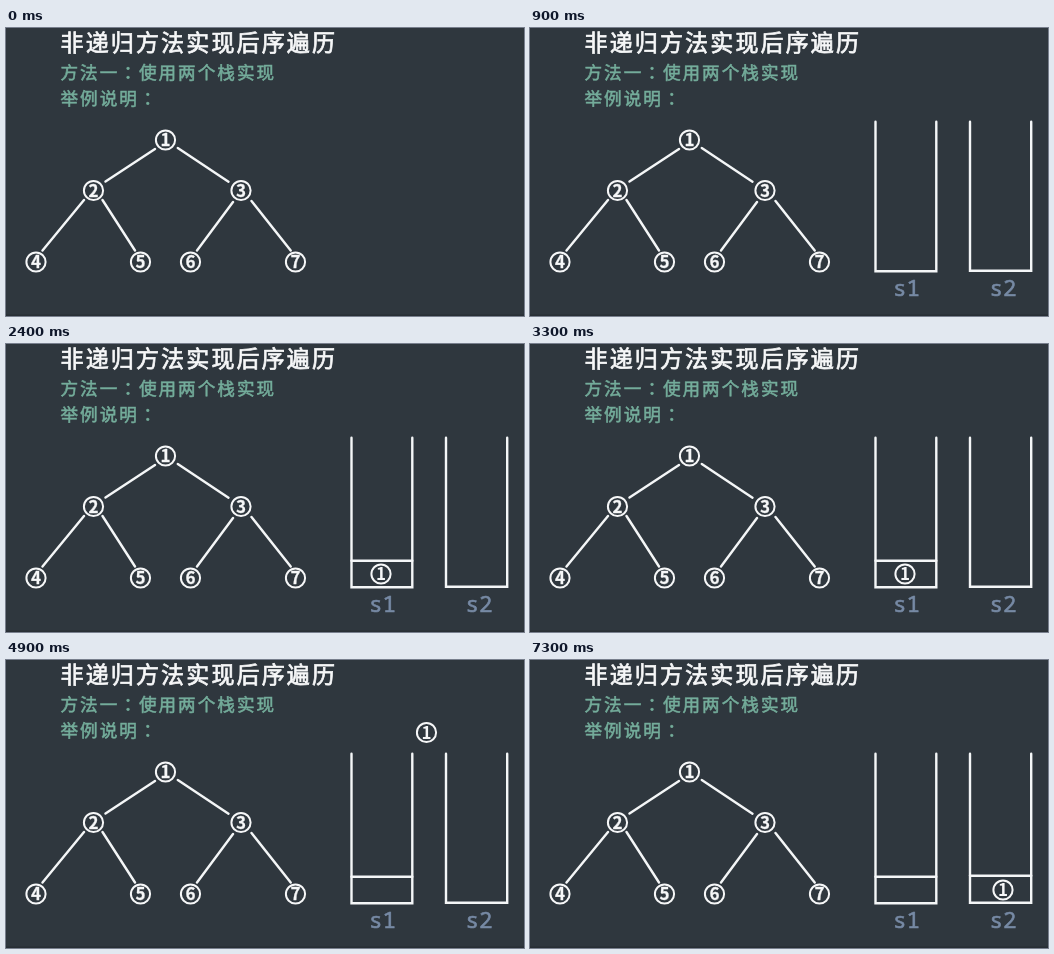
These frames come from a looping animation (518x288 px, 8000 ms). An HTML page:

```html
<!DOCTYPE html>
<html lang="zh-CN">
<head>
<meta charset="utf-8">
<style>
  html, body { margin: 0; width: 100%; height: 100%; overflow: hidden; background: #2f373e; }
  svg { display: block; width: 100%; height: 100%; }
  .cjk { font-family: "Noto Sans CJK SC", "Noto Sans CJK", sans-serif; }
  .colon { font-family: "Noto Sans CJK TC", "Noto Sans CJK", sans-serif; }
  .title { font-size: 23px; letter-spacing: 2.15px; fill: #f6f7f8; stroke: #f6f7f8; stroke-width: .75; }
  .sub { font-size: 17.6px; letter-spacing: 2px; fill: #74ad9b; stroke: #74ad9b; stroke-width: .55; }
  .line { fill: none; stroke: #f4f6f7; stroke-width: 2.4; stroke-linecap: round; }
  .ring { fill: none; stroke: #f6f7f8; stroke-width: 2; }
  .num { font: 700 17px "Noto Sans CJK SC", "Noto Sans CJK", sans-serif; fill: #f6f7f8; text-anchor: middle; }
  #tree .num { stroke: #f6f7f8; stroke-width: .3; }
  .label { font: 22.5px "Noto Sans Mono", "DejaVu Sans Mono", monospace; fill: #778aa5; stroke: #778aa5; stroke-width: .6; text-anchor: middle; }
</style>
</head>
<body>
<svg viewBox="0 0 518 288" preserveAspectRatio="none">
  <rect width="518" height="288" fill="#2f373e"/>
  <rect y="286.5" width="518" height="1.5" fill="#282f35"/>
  <text class="cjk title" x="54.5" y="22.800">非递归方法实现后序遍历</text>
  <text class="cjk sub" x="54.5" y="51">方法一<tspan class="colon" lang="zh-TW">：</tspan>使用两个栈实现</text>
  <text class="cjk sub" x="54.5" y="76.700">举例说明<tspan class="colon" lang="zh-TW">：</tspan></text>
  <path class="line" d="M149 121L99.500 153.500M171.800 120L222.500 153.700M78 172L36.500 222.500M96.500 172L129 222.500M227 174L191 222.500M245.500 173L284.700 222.500"/>
  <g id="tree"></g>
  <g id="stacks">
    <path class="line" d="M345.500 93.800V243.300H406.300V93.800M440 93.800V242.700H501.200V93.800"/>
    <text class="label" x="376.500" y="267.700">s1</text>
    <text class="label" x="473" y="267.700">s2</text>
  </g>
  <path id="level1" class="line" d="M345.500 216.800H406.300"/>
  <path id="level2" class="line" d="M440 215.800H501.200"/>
  <g id="ball"></g>
</svg>
<script>
const LOOP = 8000, FADE = 500;
const $ = id => document.getElementById(id);
const disc = (n, x, y) =>
  `<g transform="translate(${x} ${y})"><circle class="ring" r="9.600"/><text class="num" y="6.200">${n}</text></g>`;

const nodes = [[159.5, 112], [87.5, 162.5], [235, 162.5], [30, 234], [134.5, 234], [184.5, 234], [289.5, 234]];
$('tree').innerHTML = nodes.map(([x, y], i) => disc(i + 1, x, y)).join('');
$('ball').innerHTML = disc(1, 0, 0);

// steps: [time in ms, properties]
function play(id, steps) {
  const frames = steps.map(([t, props]) => ({ offset: t / LOOP, ...props }));
  $(id).animate(frames, { duration: LOOP, iterations: Infinity });
}

function fadeIn(id, start) {
  play(id, [
    [0, { opacity: 0 }],
    [start, { opacity: 0 }],
    [start + FADE, { opacity: 1 }],
    [LOOP, { opacity: 1 }]
  ]);
}

const at = (x, y) => ({ transform: `translate(${x}px, ${y}px)` });
const root = at(159.5, 112), inS1 = at(375, 230), between = at(420.5, 72.5), inS2 = at(473, 230);
const PUSH1 = 1295, POP = 4295, PUSH2 = 6090;

fadeIn('stacks', 390);
fadeIn('level1', PUSH1);
fadeIn('level2', PUSH2);
play('ball', [
  [0, root], [PUSH1, root],
  [PUSH1 + FADE, inS1], [POP, inS1],
  [POP + FADE, between], [PUSH2, between],
  [PUSH2 + FADE, inS2], [LOOP, inS2]
]);
play('ball', [
  [0, { visibility: 'hidden' }], [PUSH1, { visibility: 'hidden' }],
  [PUSH1, { visibility: 'visible' }], [LOOP, { visibility: 'visible' }]
]);
</script>
</body>
</html>
```
